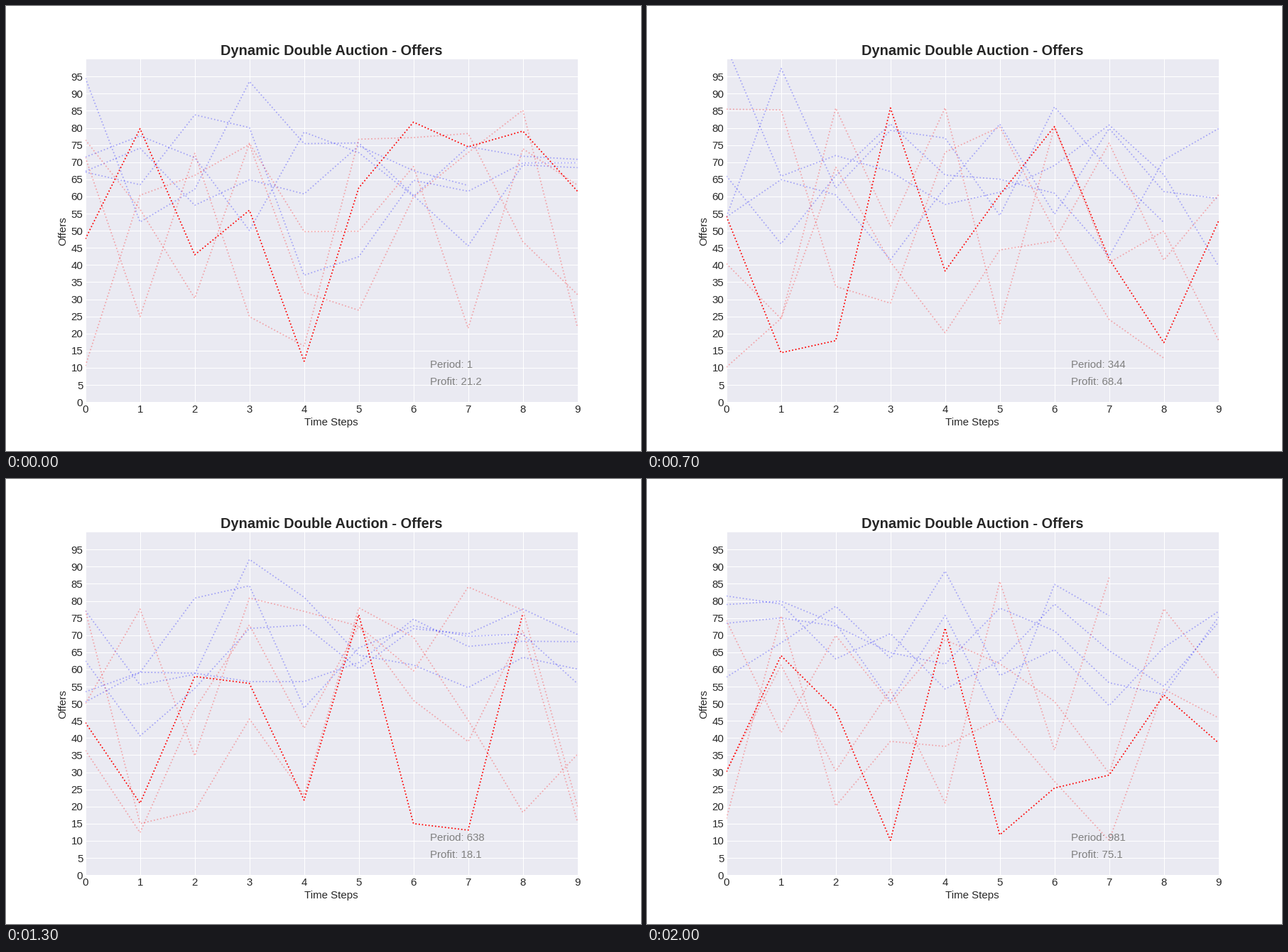
Recreate the animation shown at these times as a matplotlib script. Size 894 by 626 pixels, loop 2100 ms.

```python
import numpy as np
import matplotlib.pyplot as plt
from matplotlib.animation import FuncAnimation

W, H, DPI = 894, 626, 72
FRAMES, INTERVAL = 21, 100
STEPS, BUYERS, SELLERS = 10, 4, 4
INK = "0.15"

# Profit at a few key periods
PERIODS = [1, 148, 246, 442, 638, 834, 981]
PROFITS = [21.2, 61.2, 55.9, 80.9, 18.1, 72.4, 75.1]


def close_deal(rng, group):
    """One random trader of the group may leave the market early."""
    rows = [list(row) for row in group]
    k = rng.integers(len(rows))
    rows[k] = rows[k][:rng.integers(STEPS - 2, STEPS + 1)]
    return rows


def market(period):
    """Offers of all traders; the last seller is the highlighted one."""
    rng = np.random.default_rng(period)
    buyers = rng.normal(67, 13, (BUYERS, STEPS)).clip(37, 105)
    sellers = rng.uniform(10, 88, (SELLERS, STEPS))
    return close_deal(rng, buyers) + close_deal(rng, sellers)


plt.rcParams.update({
    "font.family": "Liberation Sans", "font.size": 15,
    "text.color": INK, "axes.labelcolor": INK,
    "xtick.color": INK, "ytick.color": INK,
})

fig = plt.figure(figsize=((W + 0.01) / DPI, (H + 0.01) / DPI), dpi=DPI,
                 facecolor="white")
ax = fig.add_axes([0.125, 0.11, 0.775, 0.77], facecolor="#EAEAF2")
ax.set(xlim=(0, 9), ylim=(0, 100), xticks=range(10), yticks=range(0, 100, 5),
       xlabel="Time Steps", ylabel="Offers")
ax.set_title("Dynamic Double Auction - Offers", fontsize=20, weight="bold")
ax.set_axisbelow(True)
ax.grid(color="white", lw=1)
ax.tick_params(length=0)
ax.spines[:].set_visible(False)


def dotted(color, alpha=0.3):
    return ax.plot([], [], ":", color=color, alpha=alpha, lw=1.75)[0]


lines = [dotted("blue") for _ in range(BUYERS)]
lines += [dotted("red") for _ in range(SELLERS - 1)]
lines.append(dotted("red", 1))
period_text, profit_text = (
    ax.text(0.7, y, "", transform=ax.transAxes, color="0.5") for y in (0.1, 0.05))


def draw(i):
    period = 1 + 49 * i
    for line, row in zip(lines, market(period)):
        line.set_data(range(len(row)), row)
    period_text.set_text(f"Period: {period}")
    profit_text.set_text(f"Profit: {np.interp(period, PERIODS, PROFITS):.1f}")
    return [*lines, period_text, profit_text]


anim = FuncAnimation(fig, draw, frames=FRAMES, init_func=lambda: draw(0),
                     interval=INTERVAL, repeat=True, repeat_delay=0)
plt.show()
```
